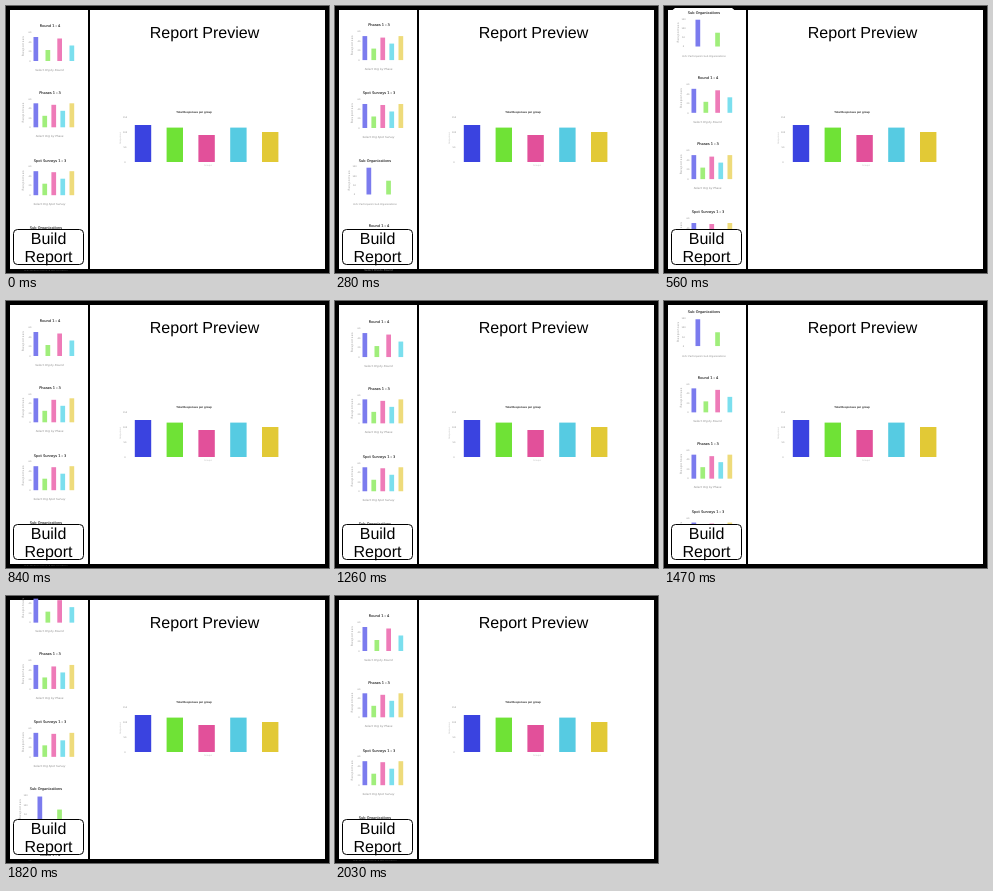
An HTML page for the animation above (2450 ms loop, 323 by 267 pixels).

```html
<!DOCTYPE html>
<html lang="en">
<head>
<meta charset="utf-8">
<title>Report Preview</title>
<style>
  html, body { margin: 0; width: 100%; height: 100%; overflow: hidden; background: #000; }
  svg { display: block; width: 323px; height: 267px; text-rendering: geometricPrecision; }
  text { text-anchor: middle; font-family: "DejaVu Sans", sans-serif; }
  .big { font: 16px "Liberation Sans", Arial, sans-serif; }
  .title { font-size: 3.55px; fill: #333; stroke: #333; stroke-width: .12px; }
  .note { font-size: 2.75px; font-style: oblique; fill: #888; }
  .axis { font-size: 3px; letter-spacing: .5px; fill: #999; }
  .tick { font-size: 2.2px; fill: #888; }
  .heading { font: bold 2.78px "Liberation Sans", Arial, sans-serif; fill: #222; }
  .faint { font-size: 2.2px; fill: #bbb; }
</style>
</head>
<body>
<svg viewBox="0 0 323 267">
  <defs><clipPath id="window"><rect x="4" y="2" width="78" height="263"/></clipPath></defs>
  <rect width="323" height="267"/>
  <rect x="4" y="4" width="78" height="259" fill="#fff"/>
  <rect x="84" y="4" width="235" height="259" fill="#fff"/>
  <g clip-path="url(#window)"><g id="list"></g></g>
  <rect x="7.5" y="223.5" width="70" height="35" rx="4" fill="#fff" stroke="#000"/>
  <text class="big" x="42.5" y="238">Build</text>
  <text class="big" x="42.5" y="256">Report</text>
  <text class="big" x="198.5" y="32">Report Preview</text>
  <g id="preview"></g>
</svg>
<script>
const NS = "http://www.w3.org/2000/svg";
const PERIOD = 267, LOOP = 2450, STEP = 70;
const SOFT = { blue: "#7b7bee", green: "#a0ee7b", pink: "#ee7bb8", cyan: "#7bdfee", yellow: "#eedb7b" };

// y: title centre; bars: [x, top below title, colour]
const CARDS = [
  { y: 20, title: "Round 1 - 4", note: "Select Org by Round",
    bars: [[27.5, 11, "blue"], [39.5, 24, "green"], [51.3, 12.5, "pink"], [63.5, 19.5, "cyan"]] },
  { y: 86.3, title: "Phases 1 - 3", note: "Select Org by Phase",
    bars: [[27.5, 11, "blue"], [36.4, 23.5, "green"], [45.4, 12.5, "pink"], [54.4, 18.5, "cyan"], [63.5, 11, "yellow"]] },
  { y: 154.2, title: "Spot Surveys 1 - 3", note: "Select Org Spot Survey",
    bars: [[27.5, 11, "blue"], [36.4, 23.5, "green"], [45.4, 12, "pink"], [54.4, 18.5, "cyan"], [63.5, 11, "yellow"]] },
  { y: 221.4, title: "Sub Organizations", note: "Info: Participants Sub Organizations", wide: true,
    bars: [[31.5, 7.5, "blue"], [51.2, 20.5, "green"]] }
];

function add(parent, tag, attrs, text) {
  const el = document.createElementNS(NS, tag);
  for (const k in attrs) el.setAttribute(k, attrs[k]);
  if (text !== undefined) el.textContent = text;
  return parent.appendChild(el);
}

function label(parent, cls, x, y, text) {
  return add(parent, "text", { class: cls, x, y }, text);
}

function upright(parent, cls, x, y, text) {
  add(parent, "text", { class: cls, transform: `translate(${x} ${y}) rotate(-90)` }, text);
}

function bar(parent, x, top, width, base, fill) {
  add(parent, "rect", { x, y: top, width, height: base - top, fill });
}

function drawCard(parent, card, shift) {
  const g = add(parent, "g", { transform: `translate(0 ${card.y + shift})` });
  const { wide } = card;
  const base = wide ? 34.3 : 35;
  if (wide) add(g, "rect", { x: 8, y: -4.5, width: 63, height: 44, rx: 5, fill: "#fff" });
  label(g, "title", wide ? 40 : 44, 1.3, card.title);
  upright(g, "axis", wide ? 14.5 : 18, 20, "Responses");
  const ticks = wide ? [150, 100, 50, 0] : [60, 40, 20, 0];
  ticks.forEach((n, i) => label(g, "tick", wide ? 19.5 : 24, 7.3 + i * (base - 6.5) / 3, n));
  for (const [x, top, color] of card.bars) bar(g, x, top, 4.7, base, SOFT[color]);
  const note = label(g, "note", wide ? 40 : 43.5, 44.8, card.note);
  if (wide) note.style.fontSize = "2.45px";
}

function drawPreview(g) {
  label(g, "heading", 188, 106.5, "Total Responses per group");
  upright(g, "faint", 114.5, 132, "Responses");
  label(g, "faint", 202, 160.3, "Groups");
  [150, 100, 50, 0].forEach((n, i) => label(g, "tick", 119, 112.3 + i * 14.8, n));
  const bars = [[119, "#3a43e0"], [121.6, "#6fe236"], [129, "#e2509a"], [121.6, "#56cbe2"], [126, "#e2c936"]];
  bars.forEach(([top, fill], i) => bar(g, 128.8 + i * 31.8, top, 16.4, 156, fill));
}

// cubic-bezier(.42, 0, .58, 1)
function easeInOut(x) {
  if (x <= 0) return 0;
  if (x >= 1) return 1;
  let lo = 0, hi = 1;
  for (let i = 0; i < 24; i++) {
    const s = (lo + hi) / 2, r = 1 - s;
    if (1.26 * r * r * s + 1.74 * r * s * s + s * s * s < x) lo = s; else hi = s;
  }
  return lo * lo * (3 - 2 * lo);
}

function scrollAt(t) {
  return PERIOD * (easeInOut(t / 806) - easeInOut((t - 1225) / 770));
}

const list = document.getElementById("list");
for (const shift of [0, PERIOD]) CARDS.forEach(card => drawCard(list, card, shift));
drawPreview(document.getElementById("preview"));

const start = performance.now();
function frame() {
  const t = (performance.now() - start) % LOOP;
  const y = scrollAt(Math.floor(t / STEP) * STEP);
  list.setAttribute("transform", `translate(0 ${(-y).toFixed(2)})`);
  requestAnimationFrame(frame);
}
frame();
</script>
</body>
</html>
```
